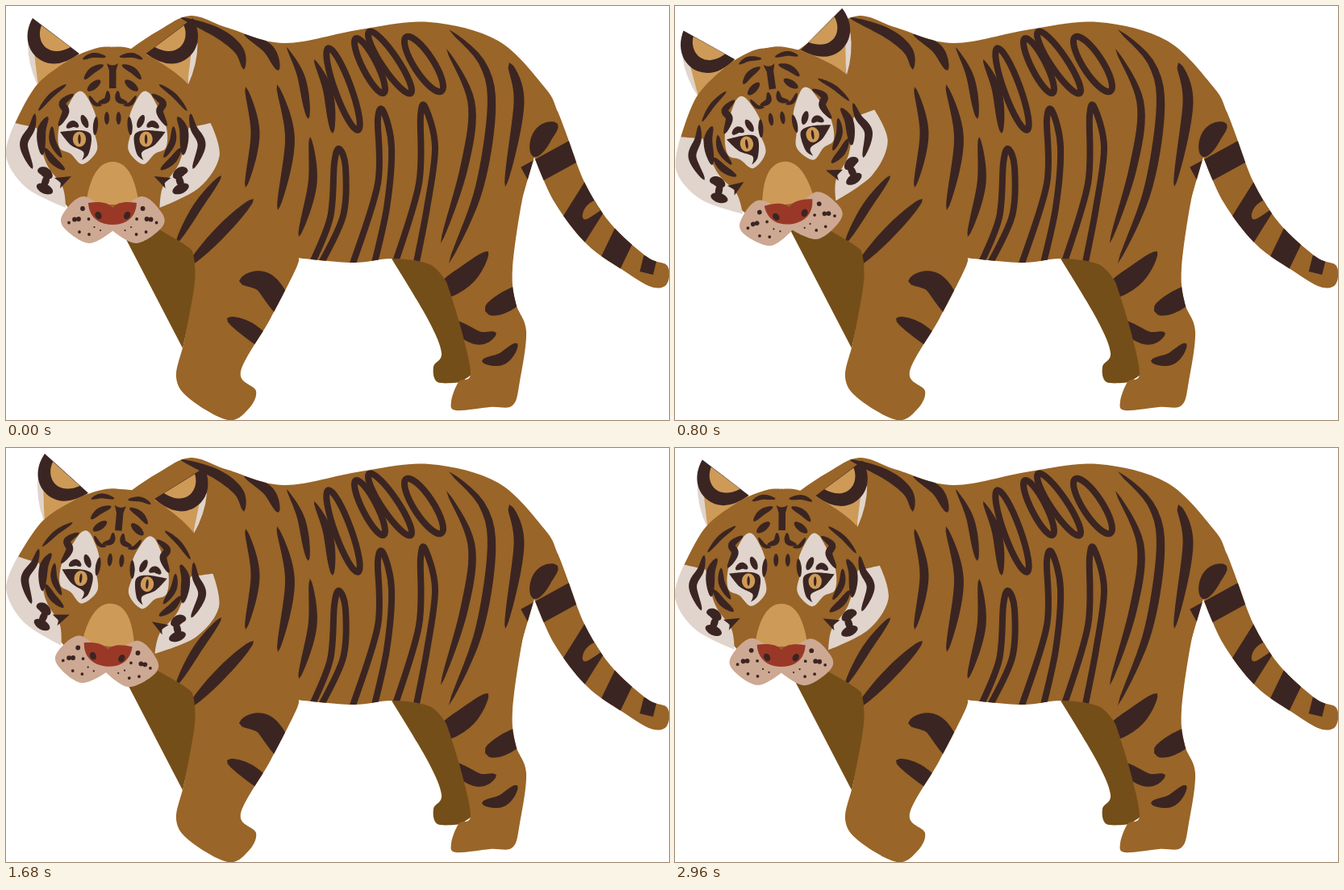
These frames come from a looping animation (822 by 513 pixels, 3 s). An HTML page:

```html
<!DOCTYPE html>
<html lang="en">
<head>
<meta charset="utf-8">
<title>Tiger</title>
<style>
  html, body { margin: 0; width: 100%; height: 100%; overflow: hidden; background: #fff; }
  svg { display: block; width: 822px; height: 513px; }
  .coat { fill: #996528; }
  .far { fill: #744e18; }
  .dark { fill: #3b2522; }
  .pale { fill: #e0d4cc; }
  .tan { fill: #ce9a57; }
  .muzzle { fill: #cda893; }
  .nose { fill: #9a3827; }
  .line { fill: none; stroke: #3b2522; stroke-width: 8; }
  .dots { stroke-linecap: round; }
  .flip { transform: matrix(-1, 0, 0, 1, 264.6, 0); }
</style>
</head>
<body>
<svg viewBox="0 0 822 513">
  <clipPath id="skin">
    <use href="#torso"/><use href="#tail"/><use href="#foreleg"/><use href="#hindleg"/>
  </clipPath>

  <g class="far">
    <path d="M219 424L140 272L190 262L240 300L236 350Z"/>
    <path data-shape="478,313* 523,388 540,430 530,447 535,466 564,466* 580,455* 560,330* 540,305* 478,300*"/>
  </g>

  <g class="coat">
    <path id="torso" data-shape="120,80* 155,53 190,30 229,12 275,27 345,46 440,29 525,20 610,43 668,101 684,131 697,165* 655,187* 641,235* 600,345* 546,342* 525,320 479,313 430,318 360,312* 300,360* 234,322* 231,303 190,277 150,255*"/>
    <path id="tail" data-shape="650,150* 684,131* 697,165 718,220 750,270 795,311 820,322 819,345 800,348 766,328 720,295 680,243 655,187*"/>
    <path id="foreleg" data-shape="230,300* 360,311* 361,322 328,387 291,453 310,477 300,500 275,513 228,487 211,460 221,415 233,350 234,320"/>
    <path id="hindleg" data-shape="655,187* 640,240 628,325 632,368 645,403 637,465 628,495 600,497 558,501 552,490 561,466 576,455 562,392 546,342*"/>
  </g>

  <g class="dark" clip-path="url(#skin)">
    <!-- back and flank -->
    <path data-spine="216,14 262,33 289,55 295,79" data-width="13" data-skew="1.3"/>
    <path data-spine="295,35 325,53 338,80" data-width="13" data-skew="1.3"/>
    <path data-spine="348,51 366,88 375,140" data-width="10" data-skew="1.4"/>
    <path data-spine="382,66 399,105 405,158" data-width="12" data-skew="1.2"/>
    <path data-spine="546,53 577,120 568,200 539,294" data-width="10"/>
    <path data-spine="549,29 590,70 602,125 586,228 549,319" data-width="11"/>
    <path data-spine="624,70 636,120 619,224" data-width="13" data-skew=".7"/>
    <path data-spine="297,100 309,158 297,225" data-width="11"/>
    <path data-spine="336,97 352,165 337,253" data-width="12"/>
    <path data-spine="377,162 380,220 363,286" data-width="11"/>
    <g class="line">
      <ellipse rx="10" ry="54" transform="translate(418 103) rotate(-20)"/>
      <ellipse rx="9" ry="38" transform="translate(451 74) rotate(-27)"/>
      <ellipse rx="10" ry="46" transform="translate(476 70) rotate(-34)"/>
      <ellipse rx="12" ry="40" transform="translate(518 72) rotate(-33)"/>
      <path data-curve="378,322 402,262 407,195 413,177 421,200 418,260 389,322"/>
      <path data-curve="429,322 461,220 461,140 468,131 478,175 472,250 456,322"/>
      <path data-curve="482,320 512,220 514,136 520,126 532,175 522,250 508,322"/>
    </g>
    <!-- shoulder and legs -->
    <path data-spine="267,210 238,248 211,294" data-width="11"/>
    <path data-spine="307,239 272,274 226,322" data-width="15"/>
    <path data-spine="289,341 322,344 355,395" data-width="28"/>
    <path data-spine="274,387 300,401 335,428" data-width="20"/>
    <path data-spine="598,304 570,334 528,362" data-width="26" data-skew="1.2"/>
    <path data-spine="594,378 615,369 655,345" data-width="25" data-skew=".8"/>
    <path data-spine="608,405 584,411 545,388" data-width="18"/>
    <path data-spine="590,440 615,437 634,418" data-width="15"/>
    <!-- tail -->
    <path data-spine="654,187 666,160 684,146" data-width="24"/>
    <g class="line">
      <path d="M645 212L718 172" stroke-width="28" style="stroke-width:28"/>
      <path d="M697 288L736 226" style="stroke-width:40"/>
      <path d="M744 330L772 272" style="stroke-width:28"/>
      <path d="M799 311L794 331" style="stroke-width:17"/>
    </g>
    <path class="coat" data-spine="716,264 726,252 745,240" data-width="15"/>
  </g>

  <g id="head">
    <g id="skull">
      <path class="pale" d="M27 46Q27 72 39 98L40 60Z"/>
      <path class="tan" d="M35 58L40 100L60 95L92 60Z"/>
      <path class="dark" d="M33 15C22 34 25 56 43 67Q64 79 91 59Z"/>
      <path class="tan" d="M44 24C36 44 52 66 80 51Z"/>
      <path class="coat" data-shape="134,51* 113,52 80,66 38,98 11,146* 20,185* 74,246* 100,275* 134,270*"/>
      <path class="pale" data-shape="11,145* 0,186 25,225 74,250* 70,224 50,195 38,151*"/>
    </g>
    <use href="#skull" class="flip"/>

    <g id="face">
      <path class="pale" data-shape="78,122 88,107 98,109 111,135 108,150 113,178 95,196 80,183 66,175 66,149"/>
      <g class="dark">
        <!-- cheek -->
        <path data-spine="36,133 32,151 22,172 33,202" data-width="10"/>
        <path data-spine="52,137 44,155 45,185" data-width="11"/>
        <path data-spine="48,176 58,191 73,203" data-width="9"/>
        <path data-spine="75,97 56,111 40,130" data-width="6"/>
        <path data-spine="39,204 47,205 57,213" data-width="12"/>
        <path data-spine="52,208 46,226" data-width="9"/>
        <path data-spine="38,222 47,226 58,231" data-width="12"/>
        <path d="M60 213L81 211L67 226L68 219Z"/>
        <!-- forehead -->
        <path data-spine="95,66 108,61 124,63" data-width="6"/>
        <path data-spine="97,91 107,80 121,73" data-width="8"/>
        <path data-spine="101,105 117,92" data-width="9"/>
        <path data-spine="114,120 125,116 126,105" data-width="7"/>
        <path data-spine="103,111 110,121 119,123" data-width="5"/>
        <path data-spine="125,131 125,147" data-width="6"/>
        <!-- around the eye -->
        <path data-spine="84,109 70,120 74,131 65,149" data-width="9"/>
        <path data-spine="112,137 110,160" data-width="6"/>
        <path data-spine="57,149 58,168 69,188" data-width="8"/>
        <path data-spine="75,151 83,146 90,150" data-width="8"/>
        <path data-spine="94,135 101,151" data-width="8"/>
        <path data-shape="67,156* 90,154 103,157 106,166 102,184 94,191* 96,181 80,172"/>
      </g>
      <ellipse class="tan" cx="91" cy="165" rx="8.2" ry="9.5"/>
      <ellipse class="dark" cx="91" cy="165" rx="1.7" ry="6"/>
    </g>
    <use href="#face" class="flip"/>
    <path class="dark" d="M125 71Q132 76 139 71L136.5 80V102H128V80Z"/>

    <path class="tan" d="M99 246C103 218 112 193 132.3 193S161 218 165 246Z"/>
    <g id="lip">
      <path class="muzzle" data-shape="133,278* 103,294 72,275 71,257 97,236 133,262*"/>
      <g class="line dots">
        <path d="M95 251h0M85 264.5h0M90 264h0" style="stroke-width:5.8"/>
        <path d="M78 268.5h0M102.5 264h0M91 280h0M103 283h0" style="stroke-width:3.8"/>
        <path d="M109.5 274h0M117 278h0" style="stroke-width:2.2"/>
      </g>
    </g>
    <use href="#lip" class="flip"/>
    <path class="nose" d="M102 244C116 242 126 243 132.3 250C138 243 148 242 162 244C161 263 148 271 132.3 271S103 263 102 244Z"/>
    <ellipse id="nostril" class="dark" rx="3.8" ry="5" transform="translate(114.5 259.5) rotate(-30)"/>
    <use href="#nostril" class="flip"/>
  </g>
</svg>
<script>
  // Smooth curve through the points; a star marks a sharp corner.
  function smooth(text, closed) {
    const pts = text.split(' ').map(s => ({ xy: s.split(',').map(parseFloat), sharp: s.endsWith('*') }));
    const n = pts.length;
    const at = i => pts[closed ? (i + n) % n : Math.min(Math.max(i, 0), n - 1)];
    const handle = (i, sign) => at(i).xy.map((v, k) =>
      at(i).sharp ? v : v + sign * (at(i + 1).xy[k] - at(i - 1).xy[k]) / 6);
    let d = 'M' + pts[0].xy;
    for (let i = 0; i < n - !closed; i++) d += `C${handle(i, 1)} ${handle(i + 1, -1)} ${at(i + 1).xy}`;
    return closed ? d + 'Z' : d;
  }

  // Brush stroke along the path: thin at both ends, skew moves the widest place.
  function ribbon(path, width, skew = 1, steps = 28) {
    const length = path.getTotalLength();
    const left = [], right = [];
    for (let i = 0; i <= steps; i++) {
      const t = i / steps, s = t * length;
      const p = path.getPointAtLength(s);
      const a = path.getPointAtLength(Math.max(s - 1, 0));
      const b = path.getPointAtLength(Math.min(s + 1, length));
      const angle = Math.atan2(b.y - a.y, b.x - a.x);
      const half = width / 2 * Math.sqrt(Math.abs(Math.sin(Math.PI * t ** skew)));
      const dx = -half * Math.sin(angle), dy = half * Math.cos(angle);
      left.push([p.x + dx, p.y + dy]);
      right.unshift([p.x - dx, p.y - dy]);
    }
    return `M${left.concat(right).join('L')}Z`;
  }

  for (const path of document.querySelectorAll('path')) {
    const { shape, curve, spine, width, skew } = path.dataset;
    if (shape) path.setAttribute('d', smooth(shape, true));
    if (curve || spine) path.setAttribute('d', smooth(curve || spine, false));
    if (spine) path.setAttribute('d', ribbon(path, +width, +(skew || 1)));
  }

  const keys = [[0, 0], [900, -9], [1680, 5], [2340, 5], [3000, 0]];
  function tilt(ms) {
    const i = keys.findIndex(k => ms < k[0]);
    const [t0, a0] = keys[i - 1], [t1, a1] = keys[i];
    return a0 + (a1 - a0) * (ms - t0) / (t1 - t0);
  }
  const head = document.getElementById('head');
  function draw() {
    head.setAttribute('transform', `rotate(${tilt(performance.now() % 3000)} 132.3 183)`);
    requestAnimationFrame(draw);
  }
  draw();
</script>
</body>
</html>
```
